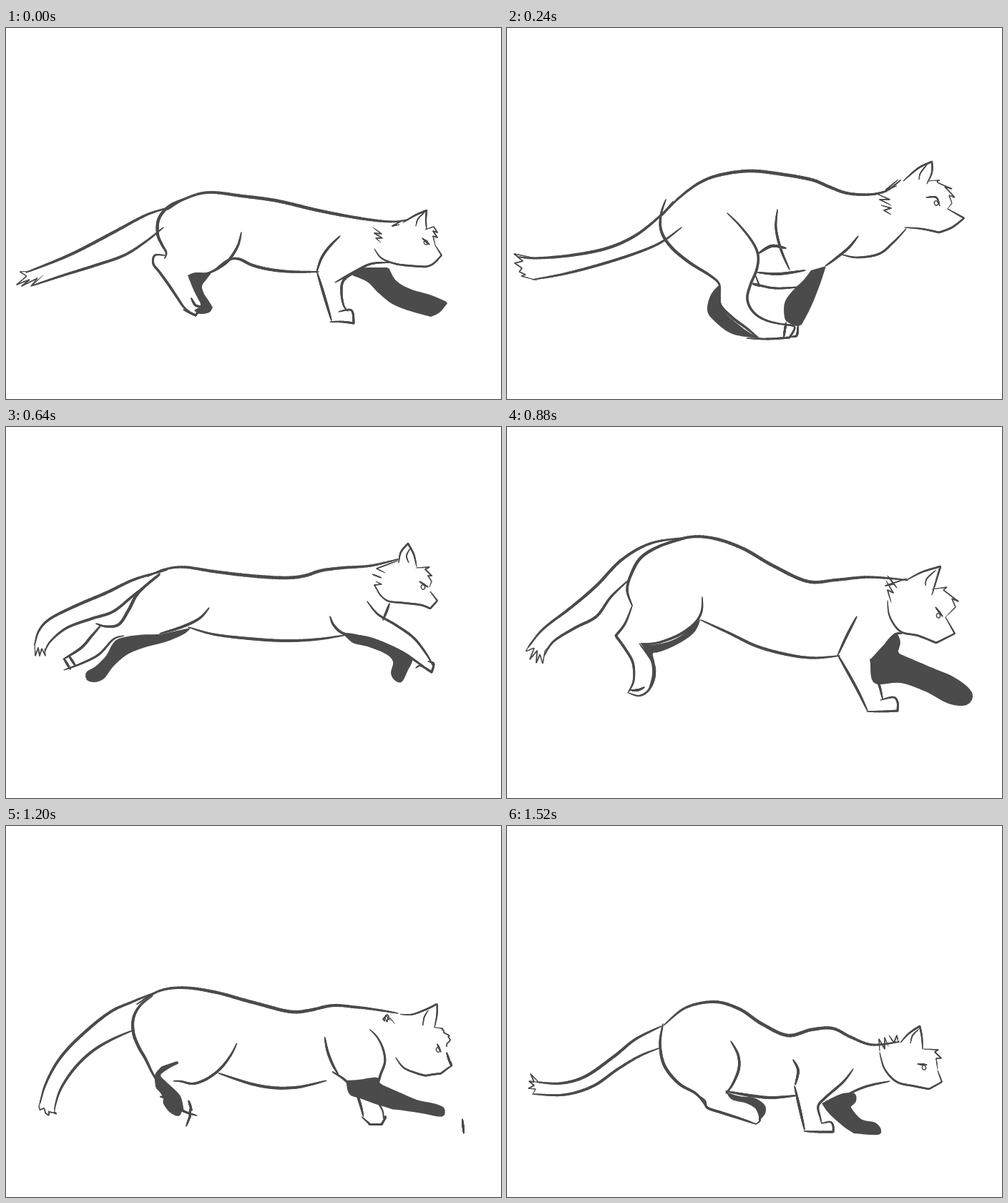
Recreate the animation shown at these times as an HTML page with a canvas. Size 692x519 px, loop 1600 ms.

```html
<!DOCTYPE html>
<html lang="en">
<head>
<meta charset="utf-8">
<title>Running cat</title>
<style>
html, body { margin: 0; width: 100%; height: 100%; overflow: hidden; background: #fff; }
canvas { display: block; width: 692px; height: 519px; }
</style>
</head>
<body>
<canvas id="stage" width="692" height="519"></canvas>
<script>
const STEP = 80, STEPS = 20, SAMPLES = 72, INK = '#4b4b4b';

// Widest point of each kind of stroke; zero means a filled shape.
const WIDTH = {
  farHind: 0, farFore: 0, back: 4.6, tailTop: 4.2, tailLow: 3.8, tip: 1.7,
  rump: 4.2, hind: 3.6, hindFoot: 3, thigh: 3.6, belly: 4, shoulder: 3.4,
  fore: 3.6, foreFront: 3.4, foreFoot: 3, chest: 3, jaw: 2.8, ear: 2.6,
  earIn: 1.6, tuft: 1.7, brow: 2.2, cheek: 1.6
};

// Points run along each stroke; "/" is a corner, ";" lifts the pen.
const POSES = [
{ at: 0, lines: `
farHind 254,346 265,342 287,343/280,352 274,361 277,372 283,381 289,391/284,398 270,400 263,395/272,388 268,378 262,366
farFore 484,346 497,336 535,335/545,353 565,365 595,374 618,384/606,398 594,404/565,396 540,386 520,370 505,355
back 226,254 250,239 283,230 330,235 380,242 440,256 500,267 540,271 562,268
tailTop 28,342 90,317 150,286 195,262 228,251
tailLow 35,361 80,346 125,332 165,318 195,299 220,279
tip 36,340/19,341/29,347/15,359/33,352/22,361/44,350/35,361/52,346
rump 258,236 230,248 214,266 212,288 218,303 224,314 222,322
hind 222,318 208,318 206,330 215,342 228,360 240,378 250,392 264,402
hindFoot 248,394 265,402/273,391;259,378 265,388 273,389
thigh 329,286 324,305 312,324 300,334 285,342 272,345
belly 290,340 310,325 325,323 345,332 370,338 400,341 437,341
shoulder 467,291 452,306 441,322 434,342
fore 435,342 442,365 450,392 455,409
foreFront 509,330 490,340 472,353 469,370 472,388 478,396
foreFoot 453,411 470,411 486,413/485,399 480,394 465,397
chest 460,356 485,342 510,330 537,328
jaw 515,309 525,322 545,330 570,333 587,334/597,330 609,318/600,304
ear 555,272 572,262 588,255/587,268 588,282
earIn 573,277 576,267 586,257
tuft 586,282/598,278/603,286/597,284/603,293/597,291/600,304
brow 582,294 592,303
eye 587,300
cheek 553,270/540,277/550,275;513,279/525,288/515,287/526,294/517,294/524,300`},
{ at: 3, lines: `
farHind 298,358/298,380 305,398 330,420 352,434/315,428 290,410 280,395 285,373
farFore 425,339 446,333/437,360 425,390 412,415/405,417 393,412 388,405 388,385 398,369 415,352
back 217,262 240,238 270,216 300,205 340,200 380,204 425,212 450,222 475,231 505,233 530,228 550,213
tailTop 15,320 40,322 90,318 140,308 180,290 215,262 232,243
tailLow 36,352 80,344 130,331 180,315 215,300 244,279
tip 40,322/10,316/22,326/11,329/21,336/17,341/26,345/20,347/42,353
rump 222,240 215,262 216,285 230,307 255,328 282,345 296,357 298,372
hind 298,372 299,388 315,405 335,420 352,434
hindFoot 335,434 365,435 395,433/402,418 384,414;390,412 387,432;407,416 405,430 396,432
thigh 308,259 325,276 343,299 351,318 349,338 340,360 336,380 345,398 365,410 400,417
belly 352,315 370,305 390,308
shoulder 378,254 376,280 383,310 395,338
fore 350,342 380,344 417,339
foreFront 491,291 478,307 460,322 445,333
foreFoot 347,345 353,361/345,358 375,364 413,362
chest 468,317 490,321 520,316 540,300 558,281
jaw 556,279 580,281 604,286/622,279 639,266/616,253
ear 554,214 575,196 594,187/594,202 587,218
earIn 576,212 578,203 588,190
tuft 588,214 605,213/602,216 622,225/612,222/626,237/618,234/622,245/616,253
brow 586,237 600,237 605,249
eye 600,245
cheek 547,212/530,226/545,221;517,232/535,240/521,240/537,248;523,248/537,252/527,255/537,261`},
{ at: 8, lines: `
farHind 215,290 258,281/250,289 225,300 195,308 170,318 150,335 137,352 124,357 113,354 112,343 125,335 140,320 148,305 158,296 185,291
farFore 470,288 490,290 525,301 555,314 568,325 562,340 553,357 543,354 538,344 541,328 530,317 505,307 485,302
back 198,209 222,199 250,196 290,202 340,208 390,211 418,208 440,201 470,197 510,194 548,185
tailTop 40,305 46,285 62,268 100,249 140,232 180,213 225,200
tailLow 54,315 62,300 85,281 120,268 150,258 180,234 215,207
tip 40,303/41,320/45,309/47,320/50,310/55,320/54,310
rump 215,205 185,232 172,255 158,276 140,279 126,275
hind 133,277 120,292 105,309 80,325
hindFoot 81,324 90,339;88,320 97,334;81,340 105,331 130,318 150,297 165,292
thigh 284,253 270,268 245,280 215,289
belly 255,280 290,290 340,296 390,299 435,297 475,291
shoulder 453,265 458,277 470,288 490,293
fore 475,290 510,296 550,313 575,329 594,343
foreFront 505,244 520,262 545,277 570,295 588,318 598,336
foreFoot 573,337 580,334 595,343/598,331 590,328
chest 536,247 532,258 527,270
jaw 520,231 533,243 555,246 580,249 593,254/603,243/593,230
ear 549,190 552,175 562,163/570,178 574,195
earIn 563,190 560,180 565,170
tuft 573,197/592,196/586,199/595,208/590,208/595,216/592,224
brow 578,216 590,224
eye 583,224
cheek 548,187/518,198/530,204;512,206/525,211;517,216/525,220/515,221/523,235/530,241`},
{ at: 11, lines: `
farHind 187,303 210,304 240,294 271,268/262,287 240,303 215,314 203,316/208,340 204,357 198,366/203,345 200,325
farFore 508,325 544,286/550,300 546,316/590,335 625,350 648,368 650,382 638,390 615,386 585,370 550,358 513,358
back 188,182 215,166 255,154 290,156 330,170 370,193 420,216 460,214 505,210 560,214
tailTop 30,308 50,283 90,252 125,222 160,186 200,163 246,155
tailLow 52,320 65,300 95,281 125,265 145,238 170,214
tip 34,300/26,314/38,309/32,325/42,313/41,330/46,318/50,331/53,313/60,305
rump 252,155 215,166 188,182 174,205 168,228 175,250
hind 175,250 165,275 152,292/165,310 176,330 177,355 169,372
hindFoot 170,372 185,376 198,368 206,350 204,330 185,303;172,368 183,368 192,364
thigh 273,238 272,258 262,275 240,291 210,302 187,303
belly 271,270 310,288 350,307 395,319 430,323 465,320
shoulder 489,265 475,292 463,318
fore 462,318 478,346 492,372 504,397
foreFront 508,325 513,345 520,360 525,380
foreFoot 503,398 525,398 546,397/546,385 540,378 522,382
chest 552,289 543,290 530,302
jaw 532,243 535,265 550,286 575,292 600,302/626,289/613,266
ear 557,215 580,203 606,195/600,215 594,235
earIn 585,222 587,212 600,200
tuft 594,227/615,224/610,228/631,244/622,240/627,252/613,266
brow 599,252 609,265
eye 603,264
cheek 559,212/529,222/542,220;532,208/545,225;530,215/540,232/532,228/537,245`},
{ at: 13, lines: `
farHind 310,357 327,345/316,360 312,373/325,377 355,382 372,394/360,392 335,387 305,386 297,380
farFore 476,362 498,364 520,357/514,372 540,392 565,408 603,409/609,422 575,422 538,421/515,403 495,387 480,380
back 200,250 230,233 270,231 320,235 365,247 410,266 440,265 470,261 500,272 530,276 560,266
tailTop 55,390 70,358 100,318 140,282 180,257 215,240
tailLow 76,398 84,375 105,345 135,318 160,303 192,290
tip 55,388/52,398/60,392/62,404/66,394/68,404/71,392/76,402/76,394
rump 230,233 205,250 193,275 197,303 212,326 230,347 244,370 258,393
hind 252,393 285,404 325,413 372,413
hindFoot 357,393 372,400/370,413;357,394 358,411
thigh 336,302 333,325 322,345 306,362
belly 328,342 355,353 385,360 410,362
shoulder 429,302 420,325 408,352
fore 408,352 411,364 417,378 409,385/388,385
foreFront 487,305 495,315 500,335 498,350 485,364 465,367 441,364/436,380 438,395 432,404
foreFoot 388,385 388,400/384,403 410,404 434,403
chest 522,355 536,345 545,337
jaw 530,310 540,332 565,342 590,344 608,346/626,329/613,319
ear 547,265 563,268 580,259 593,249/597,265 594,282
earIn 586,283 588,270 593,255
tuft 593,282/610,283/606,287/620,296/613,297/618,310
brow 597,305 607,313
eye 602,312
cheek 545,270/517,278/530,282/516,284/533,288;520,292/535,297/523,301/533,308`},
{ at: 17, lines: `
farHind 130,316 168,314/132,319 136,332 140,345 144,365 140,378 132,395 135,410 128,412 120,402 120,385 131,375 135,360 130,345 121,328
farFore 475,350 505,341 540,347 565,354 600,362 616,375 613,387 600,389 570,380 545,373 515,374 485,374 477,365
back 170,245 205,223 240,217 280,227 320,242 360,250 400,251 440,242 480,235 510,239 536,257
tailTop 38,375 45,350 65,315 100,280 140,246 170,235 203,224
tailLow 55,385 68,355 100,318 135,293 166,277
tip 42,360/34,390/42,380/50,402/48,385/64,402/55,392/58,378
rump 185,238 170,258 162,285 164,305 170,320
hind 180,352 163,350 160,366 156,384 160,395
hindFoot 160,394 148,403 133,412;135,372 145,380
thigh 304,300 290,322 265,346 235,362 205,366 180,353 165,348
belly 265,345 300,356 340,367 380,372 420,369 450,361 483,349
shoulder 462,289 475,310 495,329 515,341
fore 500,335 530,346 555,370 580,398 604,428
foreFront 528,273 545,292 553,315 553,338 570,360 590,382 615,412
foreFoot 600,430 625,431 648,430/643,410 630,409 615,412;638,410 640,430
jaw 556,330 572,341 590,351/628,335;616,317 622,335
ear 556,261 583,254 610,248/605,265 602,280
earIn 578,272 580,263 587,258
tuft 602,279/615,281/610,284/626,293/620,294/622,305/616,312/612,302
brow 606,303 607,316
eye 604,312
cheek 530,273/531,255/538,266/538,247/545,262/550,250/553,263`},
{ at: 19, lines: `
farHind 306,372 325,378 345,380 360,390 361,402 352,413/350,398 335,388 315,383
farFore 440,388 455,380 470,374 486,374 488,385 480,393/495,410 515,415 523,425 518,432 485,430/470,420 450,402
back 220,278 250,254 290,246 325,256 355,276 392,293 425,285 455,283 480,295 510,306 548,302
tailTop 40,358 75,360 110,350 150,322 180,298 216,280
tailLow 36,375 80,376 120,364 155,340 185,322 212,311
tip 46,360/33,347/38,358/31,357/38,363/30,367/40,368/36,375
rump 218,277 214,305 220,335 240,360 265,375 278,392
hind 262,374 276,384 280,394 300,401 325,409 348,417
hindFoot 348,417 354,410 347,392 330,384 308,374
thigh 313,301 323,320 324,340 315,362 306,374
belly 306,371 340,377 370,380 405,377
shoulder 400,327 407,342 403,362
fore 402,364 408,390 416,425
foreFront 484,340 470,358 445,380 435,392 438,408 440,416
foreFoot 415,427 435,428 456,428/456,420 452,414 440,416
chest 467,380 500,365 535,357
jaw 521,317 528,340 545,358 570,364 590,368/608,358/602,342
ear 550,303 562,290 577,280/580,295 581,312
earIn 564,304 567,293 576,284
tuft 582,312/603,313/598,316/607,325/600,325/602,340
brow 574,333 587,334
eye 583,338
cheek 521,315/520,298/528,312/528,296/533,308;534,293/541,303/545,293/547,302`}];

const mix = (a, b, u) => a + (b - a) * u;

// Smooth curve through the points of one run.
function curve(pts) {
  const out = [pts[0]];
  for (let i = 0; i + 1 < pts.length; i++) {
    const b = pts[i], c = pts[i + 1], a = pts[i - 1] || b, d = pts[i + 2] || c;
    for (let k = 1; k <= 14; k++) {
      const u = k / 14;
      out.push([0, 1].map(j => b[j] + u / 2 * (c[j] - a[j] +
        u * (2 * a[j] - 5 * b[j] + 4 * c[j] - d[j] +
        u * (3 * (b[j] - c[j]) + d[j] - a[j])))));
    }
  }
  return out;
}

// Evenly spaced points, so strokes of different poses can be blended.
function resample(pts) {
  const len = [0];
  for (let i = 1; i < pts.length; i++)
    len.push(len[i - 1] + Math.hypot(pts[i][0] - pts[i - 1][0], pts[i][1] - pts[i - 1][1]));
  const total = len[len.length - 1], out = [];
  for (let k = 0, i = 1; k <= SAMPLES; k++) {
    const at = total * k / SAMPLES;
    while (i < pts.length - 1 && len[i] < at) i++;
    const u = (at - len[i - 1]) / (len[i] - len[i - 1] || 1);
    out.push([0, 1].map(j => mix(pts[i - 1][j], pts[i][j], u)));
  }
  return out;
}

function parse(text, closed) {
  const runs = text.split('/').map(run => run.split(' ').map(p => p.split(',').map(Number)));
  if (closed) runs[runs.length - 1].push(runs[0][0]);
  let all = [];
  for (const run of runs) {
    if (all.length) run.unshift(all[all.length - 1]);
    all = all.concat(curve(run));
  }
  return resample(all);
}

const keys = POSES.map(({ at, lines }) => {
  const strokes = {};
  for (const line of lines.trim().split('\n')) {
    const cut = line.indexOf(' '), name = line.slice(0, cut);
    line.slice(cut + 1).split(';').forEach((part, i) => {
      strokes[name + ':' + i] = name === 'eye'
        ? [part.split(',').map(Number)] : parse(part, WIDTH[name] === 0);
    });
  }
  return { at, strokes };
});

function poseAt(step) {
  const n = keys.length;
  let i = n - 1;
  while (keys[i].at > step) i--;
  const wrap = k => ((k % n) + n) % n;
  const key = k => keys[wrap(k)], when = k => key(k).at + Math.floor(k / n) * STEPS;
  const t0 = when(i - 1), t1 = when(i), t2 = when(i + 1), t3 = when(i + 2);
  const span = t2 - t1, u = (step - t1) / span;
  const from = key(i).strokes, to = key(i + 1).strokes;
  const near = u < 0.5 ? from : to, pose = {};
  const h = u * u * (3 - 2 * u), hin = u * (1 - u) ** 2, hout = u * u * (u - 1);
  for (const name in near) {
    const b = from[name], c = to[name];
    if (!b || !c || u === 0) { pose[name] = near[name]; continue; }
    const a = key(i - 1).strokes[name] || b, d = key(i + 2).strokes[name] || c;
    pose[name] = b.map((p, k) => p.map((v, j) => {
      const m1 = (c[k][j] - a[k][j]) / (t2 - t0) * span * 0.6;
      const m2 = (d[k][j] - v) / (t3 - t1) * span * 0.6;
      return mix(v, c[k][j], h) + m1 * hin + m2 * hout;
    }));
  }
  return pose;
}

const ctx = document.getElementById('stage').getContext('2d');
ctx.fillStyle = ctx.strokeStyle = INK;
ctx.lineCap = ctx.lineJoin = 'round';

function fill(pts) {
  ctx.beginPath();
  pts.forEach(p => ctx.lineTo(p[0], p[1]));
  ctx.closePath();
  ctx.fill();
}

// Brush line that thins towards both ends.
function brush(pts, width) {
  for (let k = 1; k < pts.length; k++) {
    const swell = Math.sqrt(Math.sin(Math.PI * (k - 0.5) / SAMPLES));
    ctx.lineWidth = width * (0.3 + 0.7 * swell);
    ctx.beginPath();
    ctx.moveTo(...pts[k - 1]);
    ctx.lineTo(...pts[k]);
    ctx.stroke();
  }
}

function eye([x, y]) {
  ctx.lineWidth = 1.5;
  ctx.beginPath();
  ctx.ellipse(x, y, 2.6, 3.2, -0.3, 0, 7);
  ctx.stroke();
}

function draw(step) {
  ctx.clearRect(0, 0, 692, 519);
  const pose = poseAt(step);
  for (const id in pose) {
    const name = id.split(':')[0];
    if (name === 'eye') eye(pose[id][0]);
    else if (WIDTH[name]) brush(pose[id], WIDTH[name]);
    else fill(pose[id]);
  }
}

const start = performance.now();
let shown = -1;
function tick() {
  const step = Math.floor(Math.max(0, performance.now() - start) / STEP) % STEPS;
  if (step !== shown) draw(shown = step);
  requestAnimationFrame(tick);
}
tick();
</script>
</body>
</html>
```
